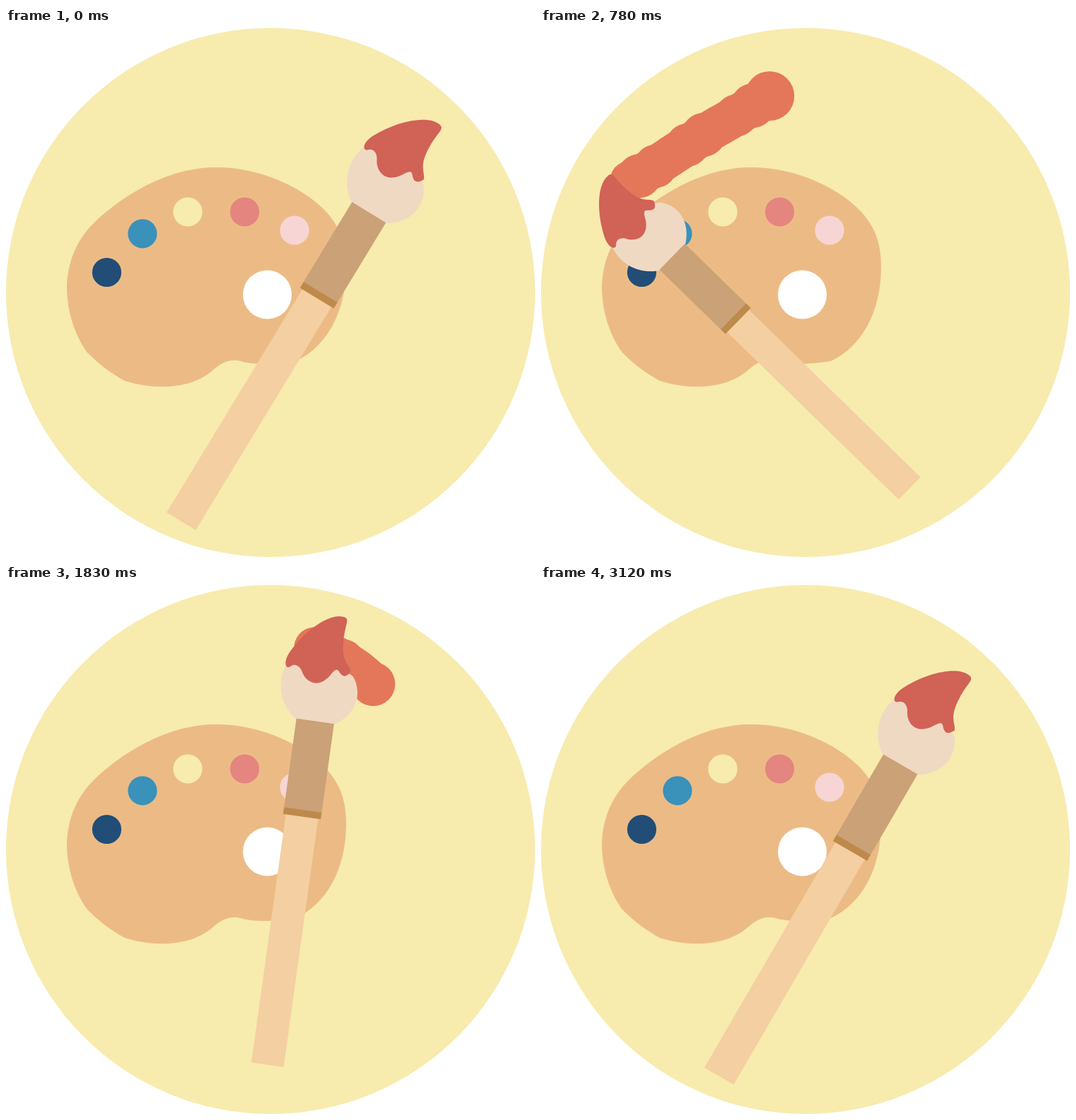
These frames come from a looping animation (748x748 px, 3.15 s). An HTML page:

```html
<!DOCTYPE html>
<html lang="en">
<head>
<meta charset="utf-8">
<title>Palette and brush</title>
<style>
  html, body { margin: 0; width: 100%; height: 100%; overflow: hidden; background: #fff; }
  svg { display: block; width: 100vw; height: 100vh; }
</style>
</head>
<body>
<svg viewBox="0 0 748 748">
  <circle cx="374" cy="374" r="374" fill="#f7ebae"/>
  <path fill="#ecbb85" d="M300 197C372 198 437 236 461 270C478 293 481 316 481 340C480 402 454 450 410 471
    C386 475 353 477 335 472S306 472 290 486C259 511 210 512 168 499C148 488 131 475 115 459
    C96 433 86 398 86 365C88 322 105 293 130 270C176 229 237 196 300 197Z"/>
  <circle cx="142.5" cy="345.5" r="20.6" fill="#214d77"/>
  <circle cx="193" cy="290.8" r="20.6" fill="#3a91ba"/>
  <circle cx="257" cy="260" r="20.6" fill="#f7ebae"/>
  <circle cx="337.5" cy="260" r="20.6" fill="#e48580"/>
  <circle cx="408" cy="286" r="20.6" fill="#f6d5d4"/>
  <circle cx="369.5" cy="377" r="34.5" fill="#fff"/>
  <g id="trail" fill="#e4775a">
    <path id="line" fill="none" stroke="#e4775a" stroke-width="57" stroke-linecap="round"
      d="M540 168C510 115 440 80 385 79C340 79 310 105 252 138S165 197 126 216"/>
  </g>
  <g id="brush">
    <rect x="-24" y="-2" width="48" height="371.3" fill="#f4cfa1"/>
    <path fill="#f0d9c3" d="M-28 -141C-50 -155 -66 -185 -54 -218L0 -240L46 -215C62 -195 62 -162 28 -141Z"/>
    <rect x="-28" y="-142" width="56" height="133" fill="#cba177"/>
    <rect x="-28" y="-10" width="56" height="10" fill="#be8a4b"/>
    <path fill="#d16256" d="M20 -300C0 -303 -33 -274 -52 -236C-59 -220 -53 -211 -47 -217S-34 -219 -30 -213
      C-22 -196 -2 -190 12 -211C17 -219 20 -225 25 -219S36 -210 42 -222C39 -232 26 -232 25 -266C24 -290 31 -299 20 -300Z"/>
  </g>
</svg>
<script>
const LOOP = 3150, SWING = LOOP / 2, STEP = 30;
const ERASED = 1000;   // time in a swing when the trail is gone
const $ = id => document.getElementById(id);

// Key poses of one swing: time, x, y, angle
const poses = [
  [0, 439.5, 382, 31.3],
  [255, 418.5, 327.5, 7.9],
  [310, 395, 322, -2],
  [450, 307.5, 360, -28.3],
  [705, 272.5, 419.5, -46.7],
  [1065, 367, 333.5, -17.1],
  [1110, 389, 323.5, -9.6],
  [1200, 414, 321, 4],
  [1545, 437, 376, 30.2]
];

function poseKey(i) {
  const n = poses.length, turn = Math.floor(i / n);
  const [t, ...rest] = poses[i - turn * n];
  return [t + turn * SWING, ...rest];
}

// Slope at b of the parabola through three keys
function slope(a, b, c, k) {
  const h0 = b[0] - a[0], h1 = c[0] - b[0];
  return (h1 * (b[k] - a[k]) / h0 + h0 * (c[k] - b[k]) / h1) / (h0 + h1);
}

// Smooth periodic curve through the key poses
function pose(t) {
  const i = poses.findLastIndex(p => p[0] <= t);
  const [a, b, c, d] = [i - 1, i, i + 1, i + 2].map(poseKey);
  const h = c[0] - b[0], u = (t - b[0]) / h, v = 1 - u;
  return [1, 2, 3].map(k =>
    v * v * (1 + 2 * u) * b[k] + u * u * (3 - 2 * u) * c[k] +
    u * v * h * (v * slope(a, b, c, k) - u * slope(b, c, d, k)));
}

const clamp = x => Math.min(1, Math.max(0, x));
const ramp = (t, from, to) => clamp((t - from) / (to - from));
const smooth = x => x * x * (3 - 2 * x);

// The brush lays a line of uneven dabs, which give the trail its scalloped edge
const line = $("line"), length = line.getTotalLength();

function addDab(at, r) {
  const node = document.createElementNS("http://www.w3.org/2000/svg", "circle");
  $("trail").append(node);
  moveDab(node, at, r);
  return { at, node };
}
function moveDab(node, at, r) {
  const { x, y } = line.getPointAtLength(at);
  node.setAttribute("transform", `translate(${x} ${y})`);
  node.setAttribute("r", r);
}

const dabs = [];
for (let at = 8; at < length; at += 27) dabs.push(addDab(at, 30 + 1.5 * Math.sin(at * 2.4)));
const end = addDab(0, 30).node;

function drawTrail(t) {
  const head = length * smooth(ramp(t, 45, 650));
  const tail = 110 * ramp(t, 165, 450) + 62 * ramp(t, 450, 705) + (length - 172) * ramp(t, 705, ERASED);
  $("trail").style.display = t > 90 && t < ERASED ? "" : "none";
  line.setAttribute("stroke-dasharray", `${Math.max(head - tail, .1)} 9999`);
  line.setAttribute("stroke-dashoffset", -tail);
  moveDab(end, tail, Math.min(35, 28 + t / 100));
  for (const { at, node } of dabs)
    node.style.display = at >= tail && at <= head ? "" : "none";
}

function draw(now) {
  const t = Math.floor(now % LOOP / STEP) * STEP % SWING;
  const [x, y, angle] = pose(t);
  // The brush grows a little as it leans to the right
  const scale = .949 + .00125 * angle + 1.21e-5 * angle * angle;
  $("brush").setAttribute("transform", `translate(${x} ${y}) rotate(${angle}) scale(${scale})`);
  drawTrail(t);
}

let start;
function tick(now) {
  start ??= now;
  draw(now - start);
  requestAnimationFrame(tick);
}
draw(0);
requestAnimationFrame(tick);
</script>
</body>
</html>
```
